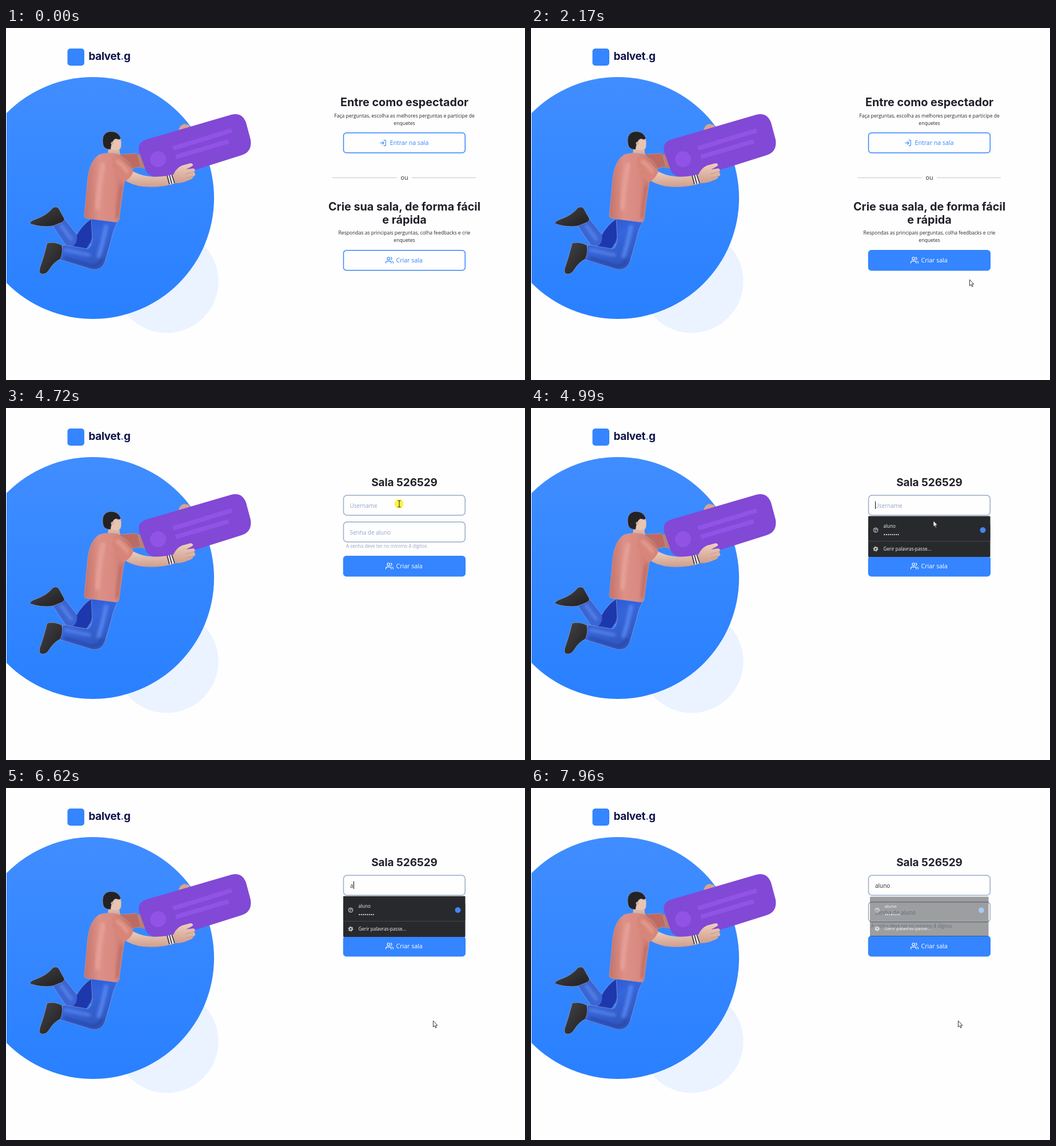
Recreate the animation shown at these times as an HTML page. Size 908 px wide and 617 px high, loop 8000 ms.

```html
<!DOCTYPE html>
<html lang="pt">
<head>
<meta charset="utf-8">
<title>Sala</title>
<style>
html, body { margin: 0; width: 100%; height: 100%; overflow: hidden; background: #fefefe; }
svg { display: block; width: 908px; height: 617px; }
text { font-family: "Open Sans", "Noto Sans", sans-serif; fill: #29292e; }
.title { font: 700 19.75px Inter, sans-serif; fill: #1f2029; text-anchor: middle; }
.note { font-size: 8.57px; text-anchor: middle; }
.label { font-size: 10.6px; fill: currentColor; }
.field { fill: #fefefe; stroke: #9aabc9; stroke-width: 1.5; }
.input { font-size: 9.95px; }
.hint { fill: #94a4c2; }
.popup text { font-size: 8.1px; fill: #f1f2f3; }
.icon { fill: none; stroke: currentColor; stroke-width: 2; stroke-linecap: round; stroke-linejoin: round; }
.outline { fill: #fefefe; color: #3485ff; }
.rim { stroke: #aaa6c0; stroke-opacity: .6; }
.shade { fill: none; filter: url(#soft); stroke-linecap: round; }

.home, .room, .create-home, .create-room, .empty, .popup, .typed, .caret, .blink,
.arrow, .hand, .beam, .click { animation: 8s step-end infinite; }
.home { animation-name: home; }
.room { animation-name: room; }
.create-home { animation-name: create-home; }
.create-room { animation-name: create-room; }
.empty { animation-name: empty; }
.popup { animation-name: popup; transform-origin: 696.5px 225px; }
.typed, .caret { animation-name: type; }
.blink { animation-name: blink; }
.arrow { animation-name: arrow; }
.hand { animation-name: hand; }
.beam { animation-name: beam; }
.click { animation-name: click; }
.cursor { animation: move 8s linear infinite; }

@keyframes home { 0% { opacity: 1 } 41.25% { opacity: 0 } }
@keyframes room { 0% { opacity: 0 } 41.25% { opacity: 1 } }
@keyframes create-home {
  0%, 28% { fill: #fefefe; color: #3485ff }
  11.6% { fill: #3485ff; color: #fff }
}
@keyframes create-room {
  0%, 66.75% { fill: #3485ff; color: #fff }
  65.875% { fill: #fefefe; color: #3485ff }
}
@keyframes empty { 0% { opacity: 1 } 82.75% { opacity: 0 } }
@keyframes popup {
  0% { opacity: 0; transform: scale(.972) }
  60.75% { opacity: .5; transform: scale(.98) }
  61.6%  { opacity: 1; transform: none }
  98.625% { opacity: .82; transform: scale(.99) }
  99.5% { opacity: .45; transform: scale(.972) }
}
@keyframes type {
  0% { transform: translateX(0) }
  82.75% { transform: translateX(5.5px) }
  84.375% { transform: translateX(8px) }
  87% { transform: translateX(14.1px) }
  88.625% { transform: translateX(20.2px) }
  90.25% { transform: translateX(26.2px) }
}
@keyframes blink {
  0%, 65.875%, 79.375%, 96.875% { opacity: 0 }
  59.875%, 72.5%, 82.75% { opacity: 1 }
}
@keyframes move {
  0%, 6.875% { transform: translate(893px, 603px) }
  12.75%, 16% { transform: translate(722px, 402px) }
  17.625%, 23.625% { transform: translate(722px, 398px) }
  27.125%, 27.9% { transform: translate(767px, 441px) }
  32.125%, 45.375% { transform: translate(800px, 482px) }
  54.875%, 55.7% { transform: translate(698px, 189px) }
  58%, 60.75% { transform: translate(688px, 168px) }
  65% { transform: translate(728px, 244px) }
  65.875%, 66.7% { transform: translate(744px, 322px) }
  68.375%, 100% { transform: translate(747px, 408px) }
}
@keyframes arrow {
  0%, 11.6%, 56% { opacity: 0 }
  6.875%, 26.5%, 61.6% { opacity: 1 }
}
@keyframes hand { 0%, 26.5% { opacity: 0 } 11.6% { opacity: 1 } }
@keyframes beam { 0%, 61.6% { opacity: 0 } 56% { opacity: 1 } }
@keyframes click { 0%, 60.75% { opacity: 0 } 59% { opacity: 1 } }
</style>
</head>
<body>
<svg viewBox="0 0 908 617">
  <defs>
    <linearGradient id="sky" x2="0" y2="1"><stop stop-color="#408dff"/><stop offset="1" stop-color="#2980ff"/></linearGradient>
    <linearGradient id="shirt"><stop stop-color="#c47268"/><stop offset=".3" stop-color="#dd9087"/><stop offset=".6" stop-color="#d98a80"/><stop offset="1" stop-color="#bf6d64"/></linearGradient>
    <linearGradient id="jeans" x2=".6" y2="1"><stop stop-color="#2450cc"/><stop offset=".5" stop-color="#3565dc"/><stop offset="1" stop-color="#3157bd"/></linearGradient>
    <linearGradient id="shoe" x2="1" y2="1"><stop stop-color="#454547"/><stop offset="1" stop-color="#1e1e21"/></linearGradient>
    <linearGradient id="skin" x2="0" y2="1"><stop stop-color="#efd0bf"/><stop offset="1" stop-color="#cf9d8b"/></linearGradient>
    <filter id="soft" x="-50%" y="-50%" width="200%" height="200%"><feGaussianBlur stdDeviation="2.500"/></filter>
    <clipPath id="typed"><rect class="typed" x="572" y="155" width="30" height="30"/></clipPath>
    <g id="create">
      <rect x="590.5" y="389.75" width="212.75" height="35" rx="5" stroke="#3485ff" stroke-width="1.5"/>
      <g class="icon" transform="translate(664 400) scale(.58)">
        <path d="M17 21v-2a4 4 0 0 0-4-4H5a4 4 0 0 0-4 4v2M23 21v-2a4 4 0 0 0-3-3.87M16 3.13a4 4 0 0 1 0 7.75"/>
        <circle cx="9" cy="7" r="4"/>
      </g>
      <text class="label" x="682.5" y="411">Criar sala</text>
    </g>
  </defs>

  <rect width="908" height="617" fill="#fefefe"/>
  <circle cx="281" cy="444" r="90.5" fill="#eaf3ff"/>
  <circle cx="152" cy="298" r="212" fill="url(#sky)"/>
  <rect width="1" height="617" fill="#fefefe"/>

  <rect x="107.5" y="36" width="29.5" height="30" rx="5" fill="#3485ff"/>
  <text x="144.5" y="56" style="font:700 19px Inter,sans-serif;letter-spacing:-.4px;fill:#10144a">balvet<tspan fill="#3485ff">.</tspan>g</text>

  <g id="person">
    <path class="rim" fill="#3a65d3" d="M82 347L102 334 124 362Q135 343 150 333L175 345Q150 388 128 385 112 389 104 380Z"/>
    <path fill="#1d38ac" d="M124 363Q134 345 150 335L154 352Q150 376 140 387 128 387 116 383 126 377 124 363Z"/>
    <path class="shade" stroke="#5b86e8" stroke-width="5" d="M97 347L114 370"/>
    <path class="rim" fill="url(#shoe)" d="M42 343Q41 339 52 335 72 328 82 315 88 312 92 316L102 334Q103 338 97 341L82 347Q62 350 42 343Z"/>
    <path class="rim" fill="url(#jeans)" d="M149 332L196 338Q188 352 184 372L173 410Q167 426 150 423L94 406Q94 392 100 380L142 387Q149 386 151 370Z"/>
    <path class="shade" stroke="#5485ef" stroke-width="7" d="M175 348Q170 375 162 400"/>
    <path class="shade" stroke="#5682e6" stroke-width="5" d="M104 389L146 398"/>
    <path class="shade" stroke="#2745a4" stroke-width="4" d="M103 403L150 417Q163 418 168 405"/>
    <path class="rim" fill="url(#shoe)" d="M72 377Q86 374 98 381 100 394 95 405 84 410 76 423 70 433 62 431 57 430 59 421 66 402 72 377Z"/>
    <path fill="#b98070" d="M227 222H243V247L232 244Z"/>
    <path class="rim" fill="#bd6b62" d="M196 222L226 219.500Q232 220 232 228L236 243 214 248Z"/>
    <path fill="#d5a392" d="M302 180Q303 170 312 168L320 170 323 176Z"/>
    <path fill="url(#skin)" d="M180 207H197L200 222Q188 228 178 221Z"/>
    <path class="rim" fill="#e8c5b2" d="M181 194Q190 187 199 191 203 199 201 209 199 216 190 215L182 213Z"/>
    <path class="rim" fill="#232326" d="M169 197Q169 184 181 181.500 196 180 201 193 199 197 195 195 191 193 188 197 184 203 183 213 174 213 171 208 169 204 169 197Z"/>
    <circle cx="186" cy="202" r="2.500" fill="#dcae9a"/>
    <path class="rim" fill="url(#shirt)" d="M163 222Q178 217 196 221L212 232Q222 242 222 255L207 270Q202 300 198 335 197 341 190 340L143 334Q136 333 137 328L143 262Q147 232 163 222Z"/>
    <path class="shade" stroke="#b9675e" stroke-width="4" d="M201 276Q197 305 194 332"/>
    <path class="shade" stroke="#e6a097" stroke-width="8" d="M170 240Q163 270 160 315"/>
    <path fill="#8248d6" d="M247 195L394 152Q413 147 420 166L428 196Q431 217 412 223L330 249Q275 264 258 260 247 258 244 248L233 217Q229 200 247 195Z"/>
    <g fill="none" stroke="#9153e6" stroke-width="8">
      <path d="M292 211L395 179.500M297 226L390 198.500"/>
    </g>
    <circle cx="266" cy="230" r="14" fill="#9153e6"/>
    <path fill="url(#skin)" d="M220 250Q245 265 282 259L294 257 297 272Q270 281 240 278 222 276 208 267Z"/>
    <path fill="url(#skin)" d="M292 259Q297 246 308 241L323 237Q329 238 326 242L315 248 328 246Q333 249 329 252L331 256Q332 259 328 260 327 265 319 267 310 272 297 272Z"/>
    <path fill="none" stroke="#c6907f" stroke-width=".8" d="M328 252L314 256M328 260L315 263"/>
    <path fill="none" stroke="#eeeaf0" stroke-width="10" d="M286 258L291 273"/>
    <path fill="none" stroke="#35313d" stroke-width="1.700" d="M282 259L286 274M286 258L290 273M290 257L295 272"/>
    <path fill="#d78579" d="M188 225Q205 228 223 251 219 263 206 271 190 258 186 240Z"/>
    <path class="shade" stroke="#e5a096" stroke-width="5" d="M195 234Q206 242 212 252"/>
  </g>

  <g class="home">
    <text class="title" x="697" y="136.500">Entre como espectador</text>
    <text class="note" x="697" y="156.500">Faça perguntas, escolha as melhores perguntas e participe de</text>
    <text class="note" x="697" y="169.500">enquetes</text>
    <g class="outline">
      <rect x="590.5" y="183.75" width="212.75" height="35" rx="5" stroke="#3485ff" stroke-width="1.5"/>
      <path class="icon" transform="translate(653 195) scale(.54)" d="M15 3h4a2 2 0 0 1 2 2v14a2 2 0 0 1-2 2h-4M10 17l5-5-5-5M15 12H3"/>
      <text class="label" x="671.5" y="205">Entrar na sala</text>
    </g>
    <path d="M571 262.500H684M710 262.500H822" stroke="#c4c7cb"/>
    <text class="note" x="697" y="265.500" style="font-size:10.6px">ou</text>
    <text class="title" x="697" y="320">Crie sua sala, de forma fácil</text>
    <text class="title" x="697" y="342.500">e rápida</text>
    <text class="note" x="697" y="361.500">Respondas as principais perguntas, colha feedbacks e crie</text>
    <text class="note" x="697" y="375">enquetes</text>
    <use href="#create" class="create-home"/>
  </g>

  <g class="room">
    <text class="title" x="697" y="136.500" style="font-size:18.9px">Sala 526529</text>
    <rect class="field" x="590.5" y="153" width="212.75" height="35" rx="6"/>
    <text class="input hint empty" x="601.5" y="174.500">Username</text>
    <text class="input" x="602" y="174.500" clip-path="url(#typed)">aluno</text>
    <g class="caret"><rect class="blink" x="602" y="163.500" width="1" height="13.500" fill="#111"/></g>
    <rect class="field" x="590.5" y="199.750" width="212.75" height="35" rx="6"/>
    <text class="input hint" x="601.5" y="221.500">Senha de aluno</text>
    <text class="hint" x="595" y="245" font-size="8.2">A senha deve ter no mínimo 4 dígitos</text>
    <use href="#create" y="-130" class="create-room"/>
    <g class="popup">
      <rect x="590" y="189.500" width="213.500" height="71.500" rx="1" fill="#28292c"/>
      <path d="M590 233.500H803.500" stroke="#46474b"/>
      <g fill="none" stroke="#c4c7c5">
        <circle cx="603" cy="214" r="4"/>
        <path d="M600 211.500L603 213 601.500 215.500 604 217M604 210.500V213L606.500 214"/>
        <circle cx="603" cy="247" r="2.500" stroke-width="2"/>
        <circle cx="603" cy="247" r="3.900" stroke-width="1.200" stroke-dasharray="2 2.084"/>
      </g>
      <text x="616.500" y="210">aluno</text>
      <text x="616.500" y="225" style="font-size:9.2px">••••••••</text>
      <text x="616.500" y="250">Gerir palavras-passe...</text>
      <circle cx="790.500" cy="214" r="5" fill="#4285f4"/>
    </g>
  </g>

  <g class="cursor">
    <circle class="click" cx="-.5" r="8" fill="#fbf34a"/>
    <path class="arrow" fill="#fff" stroke="#222" stroke-width=".9" d="M.4 0V11L2.800 8.700 4.600 12.500 6.200 11.800 4.500 8.100H7.800Z"/>
    <path class="hand" fill="#fff" stroke="#222" stroke-width=".9" d="M-1.500 1Q0-1 1.200 1V6q2-1 3 .3q1.800-.6 2.600.8q1.800-.2 1.800 1.600V11q0 4-4 4H1L-4 9.500Q-4 7.500-1.500 9Z"/>
    <path class="beam" fill="none" stroke="#222" d="M-2.500-5.500H-1L0-5 1-5.500H2.500M0-5V5M-2.500 5.500H-1L0 5 1 5.500H2.500"/>
  </g>
</svg>
</body>
</html>
```
